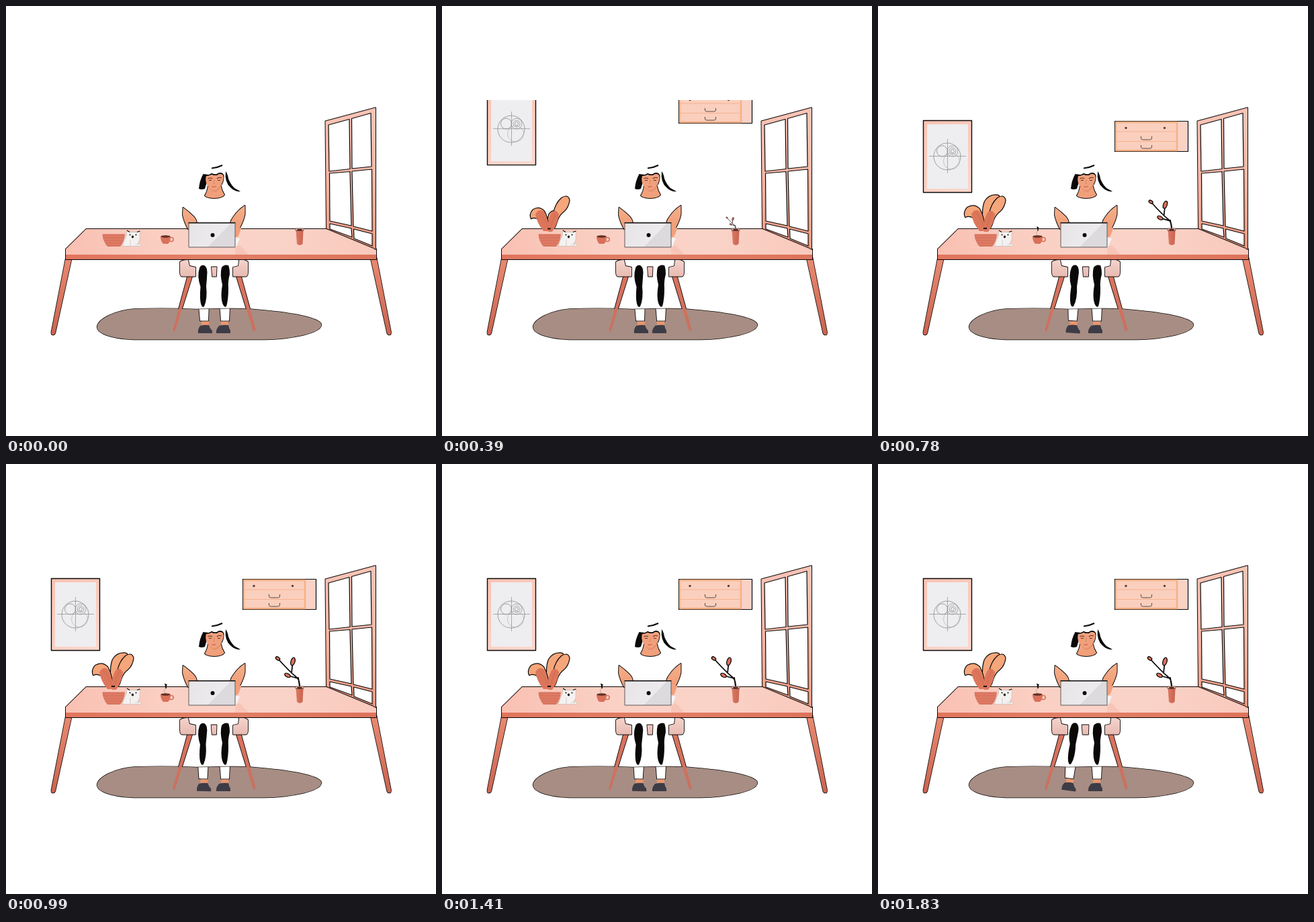
An HTML page with a canvas that plays this animation: 640 px wide and 640 px high, repeating every 1860 ms.

```html
<!DOCTYPE html>
<html lang="en">
<head>
<meta charset="utf-8">
<title>Desk</title>
<style>
html, body { margin: 0; width: 100%; height: 100%; overflow: hidden; background: #fff; }
canvas { display: block; width: 640px; height: 640px; }
</style>
</head>
<body>
<canvas id="stage" width="640" height="640"></canvas>
<script>
const g = document.getElementById('stage').getContext('2d');
const LOOP = 1860, STEP = 30;
const INK = '#0b0808', SKIN = '#f0a07c', CORAL = '#d9715b', PINK = '#fad1c5';

// Eased progress from 0 to 1 between start and start + span
function ease(t, start, span) {
  const p = Math.min(1, Math.max(0, (t - start) / span));
  return p * p * (3 - 2 * p);
}

function draw(d, fill, line = 0, color = INK) {
  const path = typeof d === 'string' ? new Path2D(d) : d;
  if (fill) { g.fillStyle = fill; g.fill(path); }
  if (line) { g.strokeStyle = color; g.lineWidth = line; g.stroke(path); }
}

// Fill with a dark rim that lies outside the shape only
function rimmed(d, fill, rim = 1) {
  draw(d, null, rim * 2);
  draw(d, fill);
}

function box(x, y, w, h, fill, line, color) {
  const p = new Path2D();
  p.rect(x, y, w, h);
  draw(p, fill, line, color);
}

function oval(x, y, rx, ry, fill, line, color, turn = 0) {
  const p = new Path2D();
  p.ellipse(x, y, rx, ry, turn, 0, 7);
  draw(p, fill, line, color);
}

function blend(x0, y0, x1, y1, ...colors) {
  const b = g.createLinearGradient(x0, y0, x1, y1);
  colors.forEach((c, i) => b.addColorStop(i / (colors.length - 1), c));
  return b;
}

function layer(fn) { g.save(); fn(); g.restore(); }

function clipBox(x, y, w, h) {
  g.beginPath();
  g.rect(x, y, w, h);
  g.clip();
}

function scaleAt(x, y, s) {
  g.translate(x, y);
  g.scale(s, s);
  g.translate(-x, -y);
}

function turnAt(x, y, a) {
  g.translate(x, y);
  g.rotate(a);
  g.translate(-x, -y);
}

const RUG = new Path2D('M135.5 478C136 466 163 453 190 451Q235 449 283 451.5L333 450.5Q362 450 390 453.5Q425 457 445 462Q470 468 469.5 475Q468 484 442 490Q415 496 385 496.5H190Q160 495 145 488Q136 484 135.5 478Z');

function poster(t) {
  layer(() => {
    clipBox(60, 140, 90, 200);
    g.translate(0, -145 * (1 - ease(t, 0, 600)));
    box(67.5, 170.5, 72, 107, blend(67, 170, 139, 278, '#f9c2b3', '#fcd8cd'), 1.4);
    box(73, 176, 61, 96, '#eeedef');
    const thin = '#8d8b8f';
    oval(103, 224, 20, 20, null, .8, thin);
    oval(95.5, 216, 8, 8, null, .8, thin);
    for (const r of [8, 5, 2.6]) oval(111, 216, r, r, null, .7, thin);
    oval(109.5, 231, 12, 12, null, .6, '#aaa8ab');
    draw('M76 223.5H131M103.5 198V249', null, .7, thin);
  });
}

function cabinet(t) {
  layer(() => {
    clipBox(345, 140, 125, 120);
    g.translate(0, -80 * (1 - ease(t, 100, 600)));
    box(352.5, 171.5, 109, 45, PINK, 1.2);
    box(354, 173, 91, 42, '#fbcfbd', 2.4, '#f7b083');
    draw('M355 187H444M355 201.5H444', null, 1, '#f3b392');
    for (const x of [369, 426.5]) oval(x, 181.5, 1.7, 1.7, '#5b403c');
    for (const y of [194, 207])
      draw(`M391.5 ${y}v3q0 2 3 2h10q3 0 3 -2v-3`, null, 1, '#574846');
  });
}

function windowFrame() {
  rimmed('M475.5 171.5L550 151.5V362L546 359.5L482 333L477 331Z',
    blend(0, 151, 0, 360, '#f8c4b6', '#f5b8a7', '#ea977f'));
  const panes = [
    'M480 177L511 168.5L512 242.5L481 246Z', 'M514.5 167.5L543 159.5L544 239L515 242Z',
    'M481.5 249L512 246.5L514 327L482 320Z', 'M515 246L544.5 243L545 335L517 328Z',
    'M482 324L514 331L515 344L482 332Z', 'M517.5 332L545 339V357L518 346Z'];
  for (const p of panes) draw(p, '#fff', 1.2);
}

function table() {
  const leg = 'M89.5 372L67.5 485Q67 490 70 489.5Q73 489 73.5 486L97.5 377Z';
  const tint = blend(0, 372, 0, 490, '#ea8a71', '#c96450');
  rimmed(leg, tint, .8);
  layer(() => {
    g.translate(640.5, 0);
    g.scale(-1, 1);
    rimmed(leg, tint, .8);
  });
  rimmed('M119.5 332H479L551 362V377H89V362Z', '#e0755d');
  draw('M119.5 332H479L547 359.5L551 362V370H89V362Z',
    blend(90, 340, 550, 370, '#f9c0b2', '#fad0c4', '#fad3c8', '#f9c9bc'));
  box(89, 370, 462, 7, blend(89, 0, 551, 0, '#e0755d', '#e27f67', '#dd735b'));
  draw('M341 359L348 356L361 370H341Z', '#f7c5b8');
}

function chair(swing) {
  rimmed(RUG, '#a78d83', .7);
  for (const d of ['M270 403H277L251.5 484H248Z', 'M343 403H350L372 483L368 484Z']) {
    layer(() => {
      clipBox(240, 395, 140, 56);
      draw(d, null, 1.8);
    });
    draw(d, blend(0, 403, 0, 484, '#dc735c', '#c9705f'));
  }
  const seat = blend(0, 378, 0, 403, '#f4d3cc', '#e7bab1');
  const left = 306 - 2.5 * swing;
  rimmed('M259 381Q264 377.5 271 378L273 387L282 389V402.5H262Q259 402 259 396Z', seat, .9);
  rimmed('M360 381Q355 376.5 347 378L346 387L338 389V402.5H357Q360 402 360 396Z', seat, .9);
  rimmed(`M${left} 388.5H313.5L313 402.5H${left + 1}Z`, seat, .9);
}

function leg(angle, pants, strip, ankleX, shoe) {
  layer(() => {
    g.clip(RUG);
    turnAt(297, 388, angle);
    rimmed(pants, '#fff', .9);
  });
  layer(() => {
    turnAt(297, 388, angle);
    draw(strip, INK);
    box(ankleX, 469.5, 11, 7, '#e9966f');
    draw(shoe, '#3d3c46');
  });
}

function legs(swing) {
  leg(.137 * swing, 'M284 440L287.5 452L289 468.5H301L302 440Z',
    'M288 390Q290 385 295 386Q299 388 299.5 396Q299 406 298 417Q300 436 295 447Q292 450 290 443Q288 435 289.5 418Q284 402 288 390Z',
    291, 'M289 476Q295 474 302 475Q304 481 307 483V487H286Q285 481 289 476Z');
  leg(0, 'M317 440L319 455L320 468.5H332L333.5 440Z',
    'M321 389Q325 384 331 386Q333 391 333 399Q330 411 331 420Q331 437 328 447Q325 450 322 442Q319 432 322 415Q318 399 321 389Z',
    320, 'M317 476Q323 474 331 475Q332 480 334 483V487H313Q312 482 317 476Z');
}

function woman() {
  const arm = blend(0, 298, 0, 333, '#f5b08b', '#ee9a74');
  rimmed('M263.5 300Q272 306 279 313Q283 317 284 323L272 332H271Q265 321 263 311Z', arm);
  rimmed('M355.5 297Q346 303 339 313Q335 318 334 323L341 332H347Q354 319 355.5 310Z', arm);
  draw('M341 325L350 331L346 342L341 347Z', SKIN);
  draw('M293.5 250L301 251L299 262L296 272Q291 274 287 272Q288 260 293.5 250Z', INK);
  rimmed('M301 267Q300 276 296 282Q298 285.5 310 286Q322 285.5 325 281Q321 275 319.5 267Z', '#f0a07a');
  draw('M298 252Q302 253 306 250Q310 252 314 251Q319 247 323 251', null, 2);
  draw('M323.5 251Q325 258 321 266', null, 1.4);
  draw('M298 253Q303 253 306 251Q310 253 314 252Q319 248 323 252Q325 259 320 266Q315 274 309.5 274Q303 272 299 266Q296 259 298 253Z', SKIN);
  draw('M301 267Q305 274 309.5 274.5Q315 274 320 266L319 270Q314 278 308 276Q304 273 301 267Z', '#e28f6d');
  draw('M300.5 257Q304 255 307 257M314 257Q317 254 321 256M302 259.5H306M315 259.5H319', null, 1.1, '#5a2f28');
  draw('M310.5 258L309 264H311', null, .8, '#d3805f');
  draw('M306.5 268.5Q309 270 312.5 268.5', null, 1.2, '#c9584a');
  draw('M306 241.5Q314 241 322 237', null, 2, INK);
  draw('M327 246Q330 250 331 257Q334 265 340 271L349 276Q341 277 334 270Q325 262 327 246Z', INK);
}

function laptop() {
  draw('M341 344L348 346L343 358H340Z', '#f5f3f3');
  box(272, 323, 69, 36, '#dcdadc');
  draw('M272 323H335L300 359H272Z', blend(272, 323, 330, 359, '#e6e4e6', '#efedef'));
  box(272, 323, 69, 36, null, 1, '#5e595c');
  draw('M271.5 322.7H341.5', null, 1.3);
  oval(307.5, 341, 3, 3, INK);
}

// Each leaf: outline, tint, growth start, growth span
const LIGHT = '#f5a67a', DARK = '#dc765b';
const LEAVES = [
  ['M159 335Q153 306 159 291Q165 281 176 281.5Q183 282 179 288Q174 296 172 306L165 335Z', LIGHT, 240, 270],
  ['M159 335Q164 322 166 309Q169 294 178 286Q187 280 189.5 289Q188 299 182 305Q175 310 172 318Q169 329 164 335Z', LIGHT, 0, 320],
  ['M155 335Q149 322 142 315Q135 311 130 314Q127 307 133 300Q143 294 151 302Q157 312 160 335Z', LIGHT, 0, 480],
  ['M151 335Q141 323 139 310Q144 300 152 306Q158 318 161 335Z', DARK, 0, 400],
  ['M158 336Q156 319 163 307Q170 302 174 310Q173 323 164 336Z', DARK, 0, 350]
];

function plant(t) {
  for (const [d, tint, start, span] of LEAVES) {
    const s = ease(t, start, span);
    if (!s) continue;
    layer(() => {
      clipBox(110, 260, 100, 72);
      scaleAt(160, 337, s);
      if (tint === LIGHT) draw(d, null, 2.4 / s);
    });
    layer(() => {
      scaleAt(160, 337, s);
      draw(d, tint);
    });
  }
  const s = ease(t, 0, 480);
  if (s) layer(() => {
    scaleAt(160, 337, s);
    draw('M158 330Q153 316 145 307M162 330Q164 317 169 308', null, .7, '#c9684c');
    draw('M157 331H162', null, 2);
  });
  draw('M143.5 339.5H177Q176 351 170 358H151Q144 350 143.5 339.5Z', '#d9735d');
  for (let y = 343; y < 357; y += 4)
    draw(`M${145 + (y - 343) * .3} ${y}H${176 - (y - 343) * .3}`, null, .8, '#e28a74');
}

function cat() {
  draw('M179 342L180 334L184 336.5H195L199.5 335L199 348L196 354Q202 353 200.5 357.5H173Q176 348 179 342Z', '#f4f2f1', .7, '#c4bab7');
  draw('M180 334L184 336.5M195 336.5L199.5 335', null, 1.2);
  oval(184.5, 340.5, 1, 1, INK);
  oval(193.5, 340.5, 1, 1, INK);
  oval(188.5, 343.5, 1.7, 2, '#252020');
  draw('M185 348V357M192 355H198', null, .7, '#c8bfbd');
}

function cup(t) {
  const s = ease(t, 300, 600);
  oval(246, 347.5, 3.2, 3, null, 1.6, CORAL);
  draw('M230 343H245Q245 351 241 354H234Q230 350 230 343Z', CORAL);
  oval(237.5, 343, 7, 1.8, '#613129');
  if (s) layer(() => {
    scaleAt(237, 341, s);
    draw('M237 341Q234 337 237.5 334', null, .8, '#b39a94');
    draw('M238 334Q239 330 236.5 327M237 331L239.5 328', null, 1.5);
  });
}

function flower(t) {
  const s = ease(t, 0, 900);
  if (s) layer(() => {
    scaleAt(437, 332, s);
    g.lineCap = 'round';
    draw('M437 334Q438 322 432 317Q422 309 405 290M425 311L426.5 297M434 319L420 315M437 331L435 318', null, 1.8);
    oval(404.5, 289.5, 3.5, 2.2, CORAL, 1.3, INK, .6);
    oval(427, 294, 3, 6, CORAL, 1.3, INK, .3);
    oval(419, 314.5, 4.6, 2.6, CORAL, 1.3, INK, .5);
  });
  draw('M431.5 334H442.5L441.5 354Q437 358 433 354Z', blend(431, 0, 443, 0, '#dc7b65', '#c9614e'));
  draw('M430.5 331H443.5L442.5 334.5H431.5Z', '#f0b8aa', .8, '#50302b');
  oval(437, 333, 4, 1.3, '#4e2923');
}

function scene(t) {
  const beat = Math.max(0, (t - 700) / 165);
  const swing = (1 - Math.cos(Math.PI * beat)) / 2;
  g.fillStyle = '#fff';
  g.fillRect(0, 0, 640, 640);
  g.lineJoin = 'round';
  poster(t);
  cabinet(t);
  chair(swing);
  legs(swing);
  table();
  windowFrame();
  woman();
  laptop();
  plant(t);
  cat();
  cup(t);
  flower(t);
}

function tick() {
  const t = performance.now() % LOOP;
  scene(Math.floor(t / STEP) * STEP);
  requestAnimationFrame(tick);
}
tick();
</script>
</body>
</html>
```
